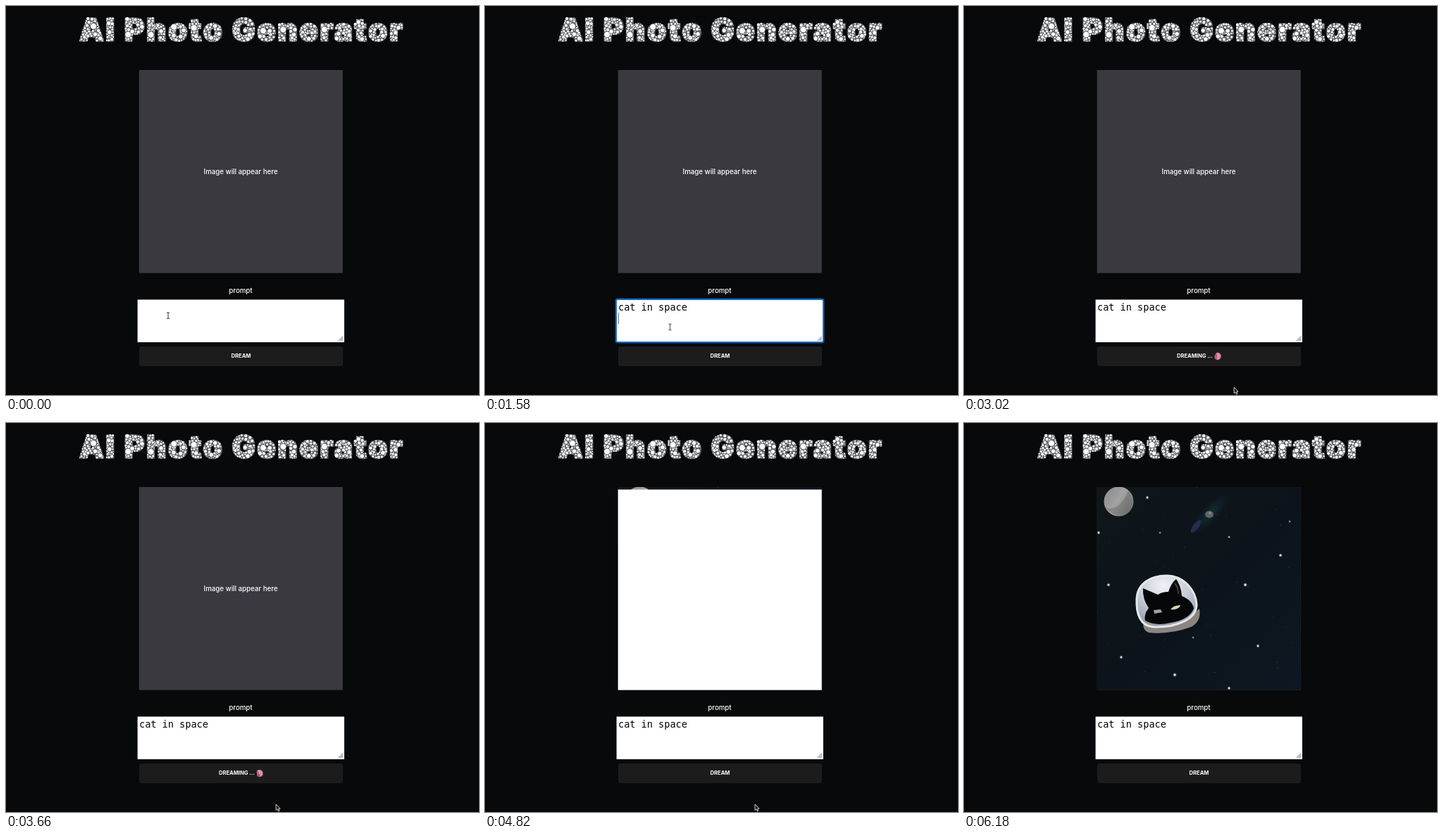
These frames come from a looping animation (671x553 px, 6.22 s). An HTML page with a canvas:

```html
<!DOCTYPE html>
<html lang="en">
<head>
<meta charset="utf-8">
<title>AI Photo Generator</title>
<style>
  html, body { margin: 0; width: 100%; height: 100%; overflow: hidden; background: #07090b; }
  body { position: relative; color: #fff; font-family: Inter, sans-serif; }
  body * { position: absolute; box-sizing: border-box; margin: 0; }
  svg * { position: static; }

  .show, .type, .caret, .ring, .reveal, .mover { animation: 6220ms step-end infinite; }
  h1 { left: 90px; top: 0; }
  h1 canvas { width: 490px; height: 64px; }
  .stage { left: 0; top: 0; }
  .label { left: 188.5px; width: 289px; text-align: center; font-weight: 500; white-space: nowrap; }
  .hint { top: 229px; font-size: 9.7px; line-height: 14px; }
  .name { top: 398px; font-size: 9.7px; line-height: 14px; }

  .ring { left: 185px; top: 416px; width: 296px; height: 63px; border: 2px solid #176bc0; border-radius: 3px;
          box-shadow: 0 0 2px #176bc0; animation-name: ring; }
  .grip { left: 470px; top: 468px; }
  .type, .caret { left: 189px; top: 420px; font: 13.55px/16px "DejaVu Sans Mono", monospace; color: #000; }
  .type { width: 12ch; overflow: hidden; white-space: pre; animation-name: type; }
  .caret { width: 1px; height: 16px; background: #68747f; animation-name: caret; }

  .button { left: 189px; top: 484px; width: 289px; height: 28px; border-radius: 3px; background: #1c1c1d; }
  .button span { font-weight: 700; font-size: 7.6px; line-height: 28px; white-space: nowrap; }
  .idle { left: 0; width: 100%; text-align: center; animation-name: idle; }
  .busy { left: 113px; animation-name: busy; }
  .brain { left: 165px; top: 7.5px; animation-name: busy; }
  .brain g { transform-origin: 6px 6px; animation: spin 700ms linear infinite; }

  .picture { animation-name: picture; }
  .reveal { fill: #fff; transform-box: fill-box; transform-origin: bottom; animation-name: reveal; }
  .mover { left: 0; top: 0; overflow: visible; animation-name: move; animation-timing-function: linear; }
  .beam { animation-name: beam; }
  .arrow { animation-name: arrow; }

  @keyframes ring { 0% { opacity: 0 } 4.82% { opacity: .6 } 5.47% { opacity: 1 } 29.26%, 100% { opacity: 0 } }
  @keyframes type {
    0% { width: 0 }
    8.04% { width: 0; animation-timing-function: steps(12, start) }
    17.04%, 100% { width: 12ch }
  }
  @keyframes caret {
    0% { opacity: 0; transform: none }
    4.82% { opacity: 1; transform: none }
    8.04% { opacity: 1; transform: none; animation-timing-function: steps(12, start) }
    17.04% { opacity: 1; transform: translateX(12ch) }
    19.29% { opacity: 1; transform: translateY(16px) }
    21.86% { opacity: 0; transform: translateY(16px) }
    24.12% { opacity: 1; transform: translateY(16px) }
    29.26%, 100% { opacity: 0; transform: translateY(16px) }
  }
  @keyframes idle { 0% { opacity: 1 } 29.26% { opacity: 0 } 74.6%, 100% { opacity: 1 } }
  @keyframes busy { 0% { opacity: 0 } 29.26% { opacity: 1 } 74.6%, 100% { opacity: 0 } }
  @keyframes spin { to { transform: rotate(360deg) } }
  @keyframes picture { 0% { opacity: 0 } 77.17%, 100% { opacity: 1 } }
  @keyframes reveal {
    0%, 77.38% { transform: none; animation-timing-function: linear }
    87.68%, 100% { transform: scaleY(0) }
  }
  @keyframes move {
    0%, 24.12% { transform: translate(230px, 440px) }
    25.4% { transform: translate(262px, 456px) }
    28%, 29.5% { transform: translate(333px, 497px) }
    33.5%, 90.5% { transform: translate(383px, 542px) }
    92.5%, 100% { transform: translate(385px, 560px) }
  }
  @keyframes beam { 0% { opacity: 1 } 8.04% { opacity: 0 } 24.12% { opacity: 1 } 26.9%, 100% { opacity: 0 } }
  @keyframes arrow { 0% { opacity: 0 } 26.9%, 100% { opacity: 1 } }
</style>
</head>
<body>
<h1 aria-label="AI Photo Generator"><canvas id="title" width="980" height="128"></canvas></h1>

<svg class="stage" width="671" height="553">
  <rect x="188.7" y="91" width="289" height="288.6" fill="#3a3940"/>
  <rect x="186.6" y="417.4" width="293.2" height="60.6" fill="#fff"/>
</svg>
<div class="label hint">Image will appear here</div>
<svg class="stage show picture" width="671" height="553">
  <defs>
    <linearGradient id="sky" x2="1" y2="1">
      <stop stop-color="#10171a"/><stop offset=".5" stop-color="#0c131a"/><stop offset="1" stop-color="#0c1822"/>
    </linearGradient>
    <linearGradient id="moon" x2="1" y2=".7">
      <stop stop-color="#8a8a8a"/><stop offset=".55" stop-color="#a2a2a2"/><stop offset="1" stop-color="#777"/>
    </linearGradient>
    <radialGradient id="glass" cx=".45" cy=".2" r=".8">
      <stop stop-color="#f0f2f5"/><stop offset=".55" stop-color="#c3cad6"/><stop offset="1" stop-color="#949bab"/>
    </radialGradient>
    <radialGradient id="haze"><stop stop-color="#103138"/><stop offset="1" stop-color="#10262e" stop-opacity="0"/></radialGradient>
    <clipPath id="crop"><rect x="188.7" y="91" width="289" height="288.6"/></clipPath>
  </defs>
  <g clip-path="url(#crop)">
    <rect x="188" y="91" width="290" height="289" fill="url(#sky)"/>
    <ellipse rx="36" ry="13" fill="url(#haze)" transform="translate(350 128) rotate(-48)"/>
    <ellipse rx="11" ry="4" fill="#222e4f" transform="translate(329 147) rotate(-52)"/>
    <ellipse cx="348" cy="130" rx="6" ry="5" fill="#5c6567"/>
    <circle cx="349" cy="128" r="2" fill="#8b8584"/>
    <g id="stars" fill="#e9ecee"></g>
    <circle cx="219.5" cy="111.5" r="21" fill="url(#moon)"/>
    <path d="M201 121Q222 125 233 96Q244 112 234 126Q218 138 201 121Z" fill="#666" opacity=".45"/>
    <path d="M254 285Q292 298 334 264Q337 282 322 290Q292 301 262 298Q254 295 254 285Z" fill="#8b8581"/>
    <path d="M245 250C246 228 265 217 287 217C312 217 329 238 330 258C330 280 299 291 269 290C250 289 244 271 245 250Z"
          fill="url(#glass)" stroke="#e6e7e9" stroke-width="3"/>
    <path d="M254 235L275 244Q281 240 290 240Q294 227 301 222Q308 232 309 246Q324 252 326 264Q319 280 293 284Q271 289 257 281Q255 272 262 263Q253 250 254 235Z" fill="#060708"/>
    <path d="M299 228q5 5 5 15" fill="none" stroke="#4c3935" stroke-width="2"/>
    <path d="M269 266l10-1 2 4-11 2z" fill="#9da4aa"/>
    <path d="M293 265q4-6 14-6-2 7-14 6z" fill="#d4d0b0"/>
  </g>
  <rect class="reveal" x="188.7" y="91" width="289" height="288.6"/>
</svg>

<div class="label name">prompt</div>
<div class="ring"></div>
<svg class="grip" width="9" height="9"><path d="M1 8L8 1V8Z" fill="#c4c4c4"/><path d="M1 8L8 1M5 8L8 5" stroke="#999" stroke-width=".6"/></svg>
<div class="type">cat in space</div>
<div class="caret"></div>

<div class="button">
  <span class="show idle">DREAM</span>
  <span class="show busy">DREAMING ...</span>
  <svg class="show brain" width="12" height="12">
    <g>
      <path d="M1 7Q1 2 6 1.5Q11 2 11 6Q11 9 8 10L5 10Q1 10 1 7Z" fill="#ee9fb9"/>
      <path d="M2 8Q5 10 8 9.5Q11 8 10.7 5Q8 7 2 8Z" fill="#b84870"/>
      <path d="M3 6Q4 3 6 5T9 4M5 3L7 2.5" fill="none" stroke="#cf6389" stroke-width=".8"/>
    </g>
  </svg>
</div>

<svg class="mover" width="1" height="1">
  <path class="show beam" d="M-2-4.5Q0-4.5 0-3Q0-4.5 2-4.5M0-3V3M-2 4.5Q0 4.5 0 3Q0 4.5 2 4.5" fill="none" stroke="#333"/>
  <path class="show arrow" d="M0 0V8.5L2 6.8L3.4 10L4.8 9.4L3.5 6.3H6Z" fill="#111" stroke="#e4e4e4" stroke-width=".9"/>
</svg>

<script>
  function randomFrom(seed) {
    return () => (seed = (seed * 16807) % 2147483647) / 2147483647;
  }

  // Packs white bubbles of shrinking size into the letter shapes.
  function drawTitle() {
    const canvas = document.getElementById('title');
    const { width, height } = canvas;
    const ctx = canvas.getContext('2d', { willReadFrequently: true });
    const random = randomFrom(41);
    ctx.scale(2, 2);
    ctx.font = '900 44px Inter, sans-serif';
    ctx.letterSpacing = '2.4px';
    ctx.lineWidth = 2.6;
    ctx.lineJoin = 'round';
    ctx.fillStyle = ctx.strokeStyle = '#fff';
    ctx.fillText('AI Photo Generator', 14, 49.5);
    ctx.strokeText('AI Photo Generator', 14, 49.5);
    const mask = ctx.getImageData(0, 0, width, height).data;
    const inside = (x, y) => mask[(Math.round(y) * width + Math.round(x)) * 4 + 3] > 120;

    ctx.setTransform(1, 0, 0, 1, 0, 0);
    ctx.globalCompositeOperation = 'source-in';
    ctx.fillStyle = '#626365';
    ctx.fillRect(0, 0, width, height);
    ctx.globalCompositeOperation = 'source-over';
    ctx.fillStyle = '#fff';

    const bubbles = [];
    const fits = (x, y, r) => {
      for (let a = 0; a < 6.28; a += 0.785) {
        if (!inside(x + r * Math.cos(a), y + r * Math.sin(a))) return false;
      }
      return bubbles.every(b => Math.hypot(b.x - x, b.y - y) > b.r + r + 0.8);
    };
    for (const [r, tries] of [[8, 60], [5.5, 250], [4, 900], [3, 5000], [2.2, 14000], [1.4, 18000]]) {
      for (let i = 0; i < tries; i++) {
        const x = random() * width, y = 20 + random() * 90;
        if (!inside(x, y) || !fits(x, y, r)) continue;
        bubbles.push({ x, y, r });
        ctx.beginPath();
        ctx.arc(x, y, r, 0, 7);
        ctx.fill();
      }
    }
  }

  function drawStars() {
    const group = document.getElementById('stars');
    const random = randomFrom(7);
    const star = (x, y, r, opacity) => {
      const dot = document.createElementNS('http://www.w3.org/2000/svg', 'circle');
      Object.entries({ cx: x, cy: y, r, opacity }).forEach(([k, v]) => dot.setAttribute(k, v));
      group.append(dot);
    };
    for (let i = 0; i < 50; i++) star(189 + random() * 289, 91 + random() * 289, 0.5, 0.1 + random() * 0.25);
    for (const [x, y, r] of [
      [260, 106, 1.4], [191, 156, 1.4], [278, 156, 0.8], [376, 162, 0.9], [449, 188, 1.5], [462, 140, 0.8],
      [205, 230, 1.5], [399, 230, 1.7], [417, 317, 1.4], [223, 333, 1.4], [299, 358, 1.7], [376, 377, 1.4], [325, 305, 0.8]
    ]) {
      star(x, y, r + 1, 0.2);
      star(x, y, r, 0.95);
    }
  }

  drawTitle();
  drawStars();
</script>
</body>
</html>
```
